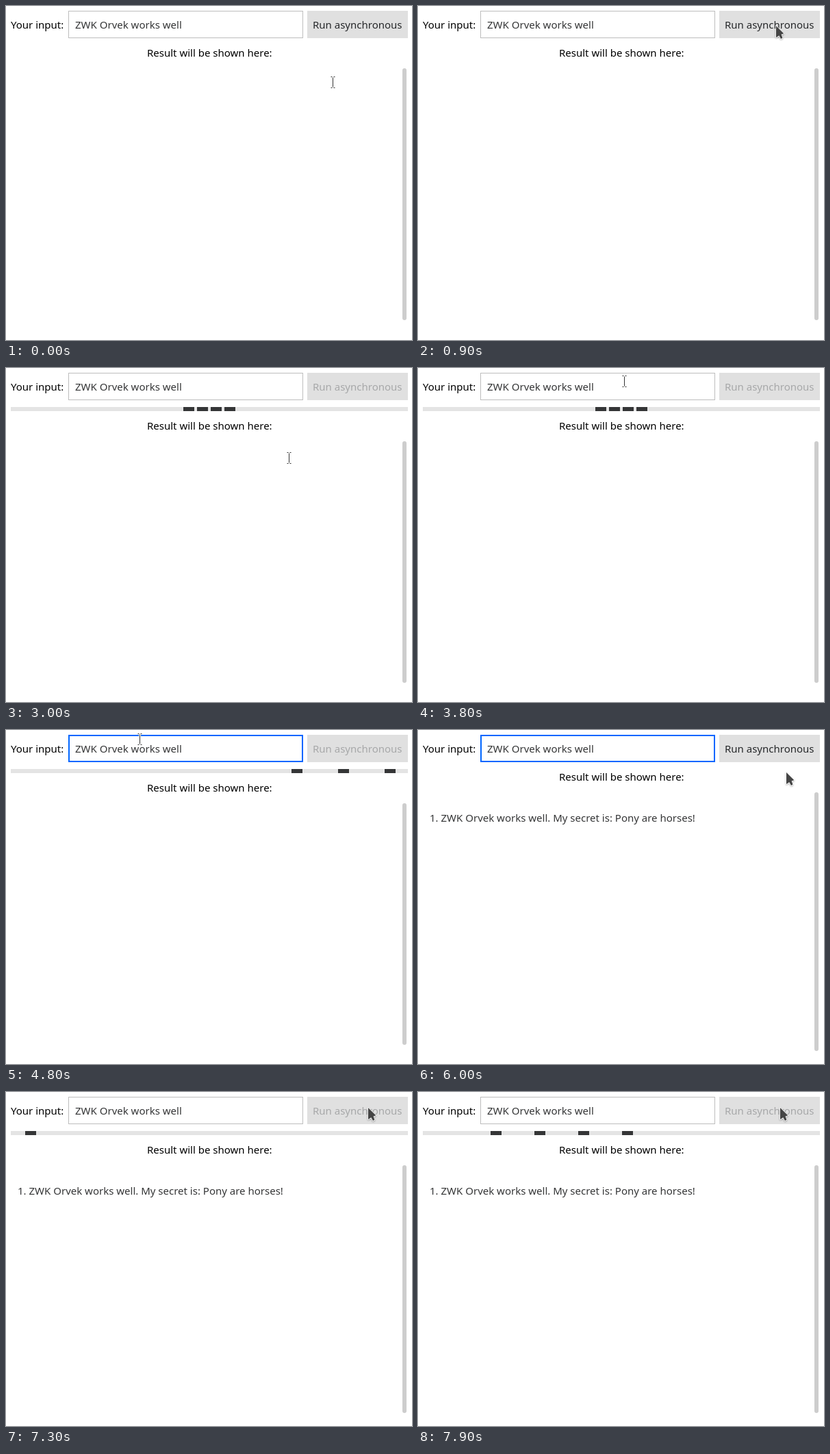
Recreate the animation shown at these times as an HTML page. Size 593 by 488 pixels, loop 8 s.

```html
<!DOCTYPE html>
<html lang="en">
<head>
<meta charset="utf-8">
<title>Asynchronous call demo</title>
<style>
  html, body { margin: 0; width: 100%; height: 100%; overflow: hidden; background: #fff; }
  svg { display: block; }
  text { font: 15px "Noto Sans", "Open Sans", sans-serif; white-space: pre; }
</style>
</head>
<body>
<svg id="stage" width="593" height="488" viewBox="0 0 593 488">
  <rect width="593" height="488" fill="#fff"/>
  <text x="7" y="33">Your input:</text>
  <rect id="field" fill="#fff"/>
  <text x="101" y="33" fill="#353637">ZWK Orvek works well</text>
  <rect id="caret" x="257" y="16" width="1" height="22" fill="#353637"/>
  <rect id="button" x="440" y="7" width="147" height="40"/>
  <text id="buttonText" x="448" y="33" fill="#26282a">Run asynchronous</text>
  <svg id="progress" x="7" y="57" width="580" height="6" overflow="hidden">
    <rect width="580" height="6" fill="#e4e4e4"/>
  </svg>
  <g id="content">
    <text x="206" y="74">Result will be shown here:</text>
    <text id="result" x="17" y="134" fill="#353637">1. ZWK Orvek works well. My secret is: Pony are horses!</text>
  </g>
  <rect id="scrollbar" x="579" width="6" rx="3" fill="#cdcdcd"/>
  <path id="arrow" d="M0 0V17L4.3 14.2 7 19 9.5 17.5 7.6 12.5 11.3 11.2Z" fill="#454545"
        stroke="#fff" stroke-width="1.6" stroke-linejoin="round" paint-order="stroke"
        style="filter:drop-shadow(0 1px 1px rgba(0,0,0,.3))"/>
  <g id="beam" fill="none">
    <path d="M-3 -8H3M0 -8V8M-3 8H3" stroke="#fff" stroke-width="3"/>
    <path d="M-3 -8H-1M1 -8H3M0 -7V7M-3 8H-1M1 8H3" stroke="#333"/>
  </g>
</svg>
<script>
const LOOP = 8000, STEP = 100, PRESS = 100;
const FIRST_CLICK = 1700, FIELD_CLICK = 4200, FINISH = 6000, SECOND_CLICK = 6900;
const CARET_BLINK = 475;
const BAR_WIDTH = 580, BLOCKS = 4, BLOCK = 16, REST_GAP = 4, MOVE_GAP = 48;

const $ = id => document.getElementById(id);
const set = (node, attrs) => {
  for (const key in attrs) node.setAttribute(key, attrs[key]);
  return node;
};
const show = (id, on) => set($(id), { visibility: on ? "visible" : "hidden" });
const within = (t, from, to) => t >= from && t < to;
const clamp = v => Math.min(1, Math.max(0, v));
const smooth = v => v * v * (3 - 2 * v);

// Each pointer move eases to a new spot; dip bends its path downwards.
const home = { x: 477, y: 112 };
const moves = [
  { from: 400, to: 900, x: 523, y: 29 },
  { from: 2500, to: 3400, x: 335, y: 79, dip: 76 },
  { from: 3400, to: 3800, x: 301, y: 20 },
  { from: FIELD_CLICK, to: 4800, x: 195, y: 14 },
  { from: 4800, to: 5400, x: 538, y: 62 },
  { from: 6200, to: 6300, x: 529, y: 23 }
];

function pointerAt(t) {
  let { x, y } = home;
  for (const move of moves) {
    const f = smooth(clamp((t - move.from) / (move.to - move.from)));
    x += (move.x - x) * f;
    y += (move.y - y) * f + (move.dip || 0) * Math.sin(Math.PI * f);
  }
  return [Math.round(x), Math.round(y)];
}

function drawPointer(t, busy) {
  const [x, y] = pointerAt(t);
  const inField = within(x, 91, 434) && within(y, 7, 47);
  const isBeam = inField || y > (busy ? 105 : 89);
  show("beam", isBeam);
  show("arrow", !isBeam);
  set($("beam"), { transform: `translate(${x + .5} ${y - .5})` });
  set($("arrow"), { transform: `translate(${x} ${y})` });
}

const blocks = Array.from({ length: BLOCKS }, () => {
  const rect = document.createElementNS("http://www.w3.org/2000/svg", "rect");
  return $("progress").appendChild(set(rect, { width: BLOCK, height: 6, fill: "#353637" }));
});

// Accelerate into the centre, rest there, then leave one after another.
function blockX(i, ms) {
  const span = BLOCKS * (BLOCK + REST_GAP) - REST_GAP;
  const rest = (BAR_WIDTH + span) / 2 - (i + 1) * BLOCK - i * REST_GAP;
  const start = -(i + 1) * BLOCK - i * MOVE_GAP;
  if (ms < 2400) return Math.min(rest, start + BAR_WIDTH * 1.6 * (ms / 1600) ** 2);
  return rest + Math.max(0, BAR_WIDTH * (ms - 2500) / 1000 - i * MOVE_GAP);
}

function drawProgress(t, busy) {
  show("progress", busy);
  const click = t < SECOND_CLICK ? FIRST_CLICK : SECOND_CLICK;
  const elapsed = Math.min(4000, Math.max(0, t - click - PRESS * .8));
  blocks.forEach((rect, i) => set(rect, { x: Math.round(blockX(i, elapsed)) }));
}

function drawForm(t, busy) {
  const focused = within(t, FIELD_CLICK, SECOND_CLICK);
  const pressed = [FIRST_CLICK, SECOND_CLICK].some(click => within(t, click, click + PRESS));
  const line = focused ? 2 : 1;
  set($("field"), {
    x: 91 + line / 2, y: 7 + line / 2, width: 343 - line, height: 40 - line,
    stroke: focused ? "#0066ff" : "#bdbdbd", "stroke-width": line
  });
  show("caret", focused && Math.floor((t - FIELD_CLICK) / CARET_BLINK) % 2 === 0);
  set($("button"), { fill: pressed ? "#cfcfcf" : "#e0e0e0" });
  set($("buttonText"), { "fill-opacity": busy ? .3 : 1 });
}

function drawContent(t, busy) {
  const done = t >= FINISH;
  const shift = busy ? 16 : 0;
  const top = 91 + shift;
  const bottom = done ? 469 : busy ? 460 : 459;
  set($("content"), { transform: `translate(0 ${shift})` });
  show("result", done);
  set($("scrollbar"), { y: top, height: bottom - top });
}

function render(t) {
  const busy = within(t, FIRST_CLICK + PRESS, FINISH) || t >= SECOND_CLICK + PRESS;
  drawForm(t, busy);
  drawProgress(t, busy);
  drawContent(t, busy);
  drawPointer(t, busy);
}

const origin = performance.now();
function tick() {
  const t = (performance.now() - origin) % LOOP;
  render(Math.floor(t / STEP) * STEP);
  requestAnimationFrame(tick);
}
tick();
</script>
</body>
</html>
```
